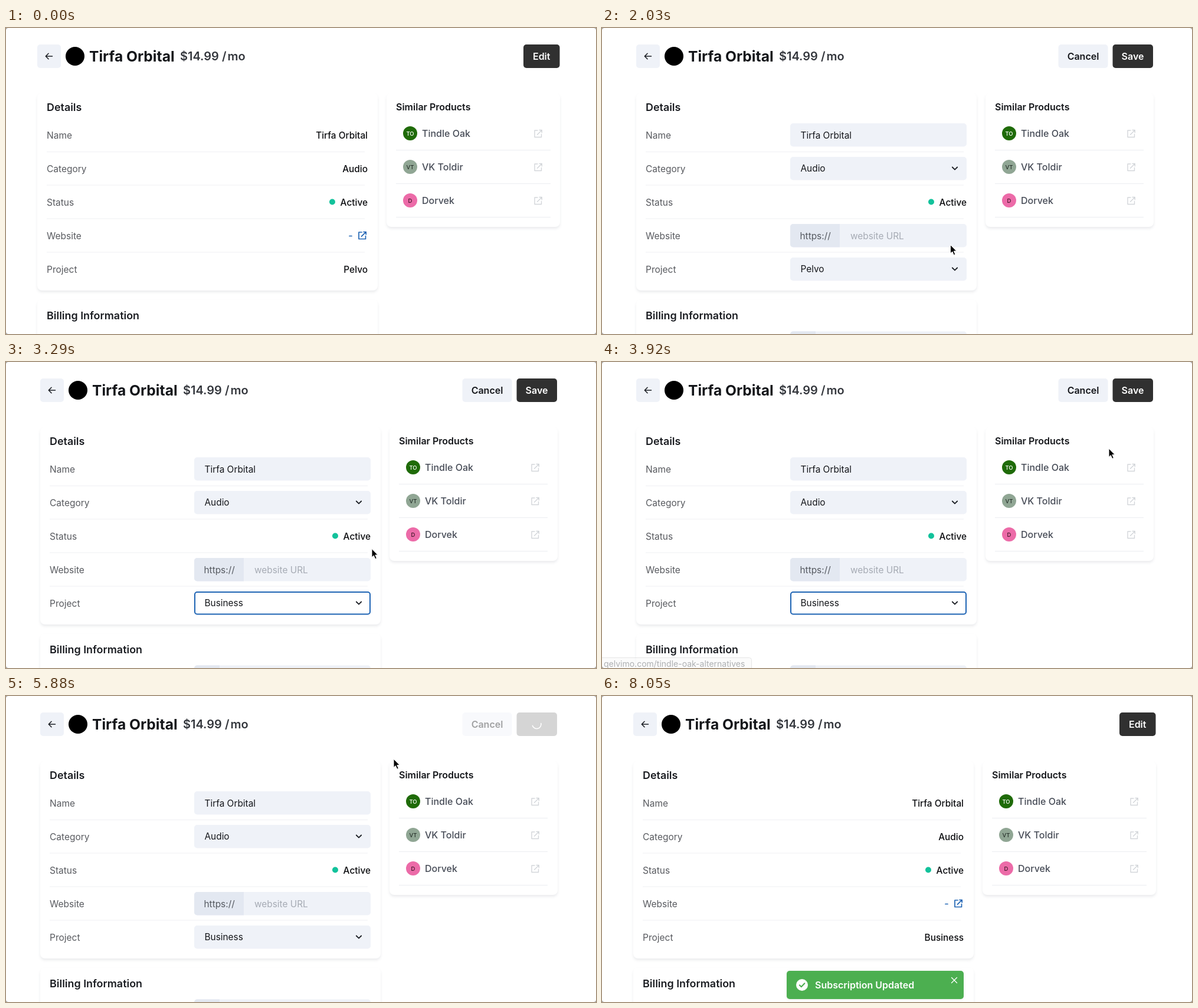
Write an HTML page that moves like this. It is 1000 by 520 pixels and loops after 8190 ms.

```html
<!DOCTYPE html>
<html lang="en">
<head>
<meta charset="utf-8">
<title>Edit subscription</title>
<style>
  html, body { margin: 0; width: 100%; height: 100%; overflow: hidden; background: #fff; }
  svg { display: block; width: 100%; height: 100%; }
  text { font-family: Inter, "Liberation Sans", sans-serif; font-size: 15.5px; fill: #14161a; white-space: pre; }
  .label { fill: #585a5f; }
  .value { font-size: 15.4px; font-weight: 450; fill: #0c0d10; text-anchor: end; }
  .field { font-size: 15.4px; }
  .head { font-size: 17.9px; font-weight: 600; fill: #1b1d22; }
  .button { font-size: 16px; font-weight: 600; text-anchor: middle; }
  .product { font-size: 16px; font-weight: 500; fill: #474c57; }
  .initials { font-size: 9.5px; font-weight: 500; text-anchor: middle; }
  .card { fill: #fff; filter: drop-shadow(0 3px 2px rgba(30, 40, 70, .09)); }
  .line { stroke: #eff0f3; }
  .stroke { fill: none; stroke-linecap: round; stroke-linejoin: round; }
</style>
</head>
<body>
<svg id="stage" viewBox="0 0 1000 520" xmlns="http://www.w3.org/2000/svg"></svg>
<script>
const LOOP = 8190, STEP = 70;
const SOFT = '#eff2f8', DARK = '#303030', BLUE = '#1e64b4';
const APP = 'Tirfa Orbital', OLD_PROJECT = 'Pelvo', NEW_PROJECT = 'Business';

const text = (x, y, str, cls = '', extra = '') =>
  `<text x="${x}" y="${y}" class="${cls}" ${extra}>${str}</text>`;
const box = (x, y, w, h, fill, r = 5, extra = '') =>
  `<rect x="${x}" y="${y}" width="${w}" height="${h}" rx="${r}" fill="${fill}" ${extra}/>`;
const path = (d, color, width, extra = '') =>
  `<path class="stroke" d="${d}" stroke="${color}" stroke-width="${width}" ${extra}/>`;
const rule = (x1, x2, y) => `<path class="line" d="M${x1} ${y}H${x2}"/>`;
const group = (id, body) => `<g id="${id}">${body}</g>`;
const linkIcon = (x, y, color, width) => path(
  `M${x - 1} ${y - 5.5}H${x - 6}V${y + 6}H${x + 5.5}V${y + 1}` +
  `M${x + 2} ${y - 6}H${x + 6.2}V${y - 1.8}M${x + 6} ${y - 5.8}L${x - 1.5} ${y + 1.7}`, color, width);
const chevron = y => path(`M593.8 ${y - 2}l4.2 4.2 4.2 -4.2`, '#1d2026', 1.8);

const rows = ['Name', 'Category', 'Status', 'Website', 'Project'];
const rowY = i => 187.5 + 57 * i;
const products = [
  ['Tindle Oak', 'TO', '#1f6b08', '#fff'],
  ['VK Toldir', 'VT', '#90a694', '#26302a'],
  ['Dorvek', 'D', '#ec6ba8', '#3a1526']
];

const main =
  box(53, 28, 40, 40, SOFT) +
  path('M78.5 48H67.5M72 43.3L67.3 48L72 52.7', '#1d2026', 1.6) +
  '<circle cx="117" cy="48" r="16" fill="#000"/>' +
  text(141, 57, APP, '', 'style="font-size:24.6px;font-weight:700"') +
  [[295, '$14.99'], [366, '/'], [375.5, 'mo']].map(([x, s]) =>
    text(x, 55, s, '', 'style="font-size:20px;font-weight:600;fill:#34373d"')).join('') +
  '<rect class="card" x="53" y="111" width="577" height="335" rx="8"/>' +
  '<rect class="card" x="53" y="462" width="577" height="120" rx="8"/>' +
  text(69, 141.3, 'Details', 'head') +
  text(69, 495, 'Billing Information', 'head') +
  rows.map((name, i) => text(69, rowY(i), name, 'label') +
    (i < 4 ? rule(69, 608, 210.5 + 57 * i - (i > 0 ? .5 : 0)) : '')).join('') +
  '<circle cx="553" cy="295.5" r="5" fill="#12c29b"/>' +
  text(613, 301.5, 'Active', 'value');

const view =
  text(613, 187.5, APP, 'value') +
  text(613, 244.5, 'Audio', 'value') +
  path('M582 353.5H586', BLUE, 1.7) + linkIcon(604, 352.5, BLUE, 1.7) +
  text(613, 415.5, '', 'value', 'id="viewProject"') +
  box(877, 28, 61.5, 40, DARK) +
  text(907.7, 53.7, 'Edit', 'button', 'style="fill:#fff"');

const edit =
  [162, 219, 333].map(y => box(319, y, 299, 39.5, SOFT)).join('') +
  box(319, 390, 299, 39.5, SOFT) +
  box(320, 391, 297, 37.5, '#fff', 4, `id="ring" stroke="${BLUE}" stroke-width="2"`) +
  text(336.5, 187.5, APP, 'field') +
  text(336.5, 244, 'Audio', 'field') + chevron(238.5) +
  '<path d="M403 333H324a5 5 0 0 0 -5 5v29.5a5 5 0 0 0 5 5H403z" fill="#e3e8f1"/>' +
  text(335.5, 358.5, 'https://', 'field', 'style="fill:#555960"') +
  text(421, 358.5, 'website URL', 'field', 'style="fill:#a6abb4"') +
  text(336.5, 415, '', 'field', 'id="editProject"') + chevron(409.5) +
  box(319, 515.5, 299, 39, SOFT) +
  '<path d="M362 515.5H324a5 5 0 0 0 -5 5V530H362z" fill="#e3e8f1"/>' +
  group('cancel', box(773.5, 28, 84, 40, SOFT) + text(815.5, 53.7, 'Cancel', 'button')) +
  box(865.5, 28, 68.5, 40, DARK, 5, 'id="saveBox"') +
  text(899.5, 53.7, 'Save', 'button', 'id="saveText" style="fill:#fff"') +
  '<circle id="spinner" class="stroke" cx="899.5" cy="48" r="7.5" stroke="#fff" stroke-width="1.6" stroke-dasharray="22.5 40"/>';

const side =
  '<rect id="sideCard" class="card" x="645" y="111" height="227" rx="8"/>' +
  text(661, 139.5, 'Similar Products', '', 'style="font-size:16px;font-weight:600"') +
  products.map(([name, initials, fill, ink], i) => {
    const y = 179 + 57 * i;
    return `<circle cx="685" cy="${y}" r="12" fill="${fill}"/>` +
      text(685, y + 3.5, initials, 'initials', `style="fill:${ink}"`) +
      text(705, y + 6, name, 'product') +
      `<path class="line sideRule" style="stroke:#ebedf1" d="M661 ${y + 28.5}H923"/>`;
  }).join('') +
  group('sideLinks', products.map((p, i) => linkIcon(902, 179.5 + 57 * i, '#d3d6da', 1.4)).join(''));

const popup =
  box(310.5, 342, 300, 88.5, '#5f6069', 6, 'stroke="#50515a" style="filter:drop-shadow(0 3px 4px rgba(0,0,0,.25))"') +
  box(316, 399, 289, 26.5, '#528bea', 4, 'id="choice"') +
  ['Select a project', NEW_PROJECT, OLD_PROJECT].map((s, i) =>
    text(335, 364.7 + 26 * i, s, '', 'style="font-size:15.4px;fill:#fff"')).join('') +
  path('M321 412.5l3 3.6 5 -8', '#fff', 1.7);

const toast =
  box(313, 467, 300, 48, '#4caf50', 5, 'style="filter:drop-shadow(0 1px 2px rgba(0,0,0,.08))"') +
  '<circle cx="339" cy="491" r="10" fill="#fff"/>' +
  path('M334.8 491.3l3 3 5.6 -6', '#4caf50', 2) +
  text(361, 497, 'Subscription Updated', '', 'style="font-size:16px;font-weight:600;fill:#fff"') +
  path('M592.5 478.5l9 9M601.5 478.5l-9 9', '#fff', 1.4);

const status =
  box(-5, 502.5, 258.5, 30, '#f8f8f8', 4, 'stroke="#ccc"') +
  text(3, 518, 'qelvimo.com/tindle-oak-alternatives', '', 'style="font-size:14px;fill:#5f6368"');

const arrow = '<path d="M0 0V14.5L3.3 11.5L5.8 17.3L8.3 16.2L5.8 10.6H10.3Z" fill="#000" stroke="#fff" stroke-width="1" stroke-linejoin="round"/>';
const hand = '<path d="M-1.6 10V1.3a1.5 1.5 0 0 1 3 0V6.5q1.5 -1.3 2.7 .3q1.5 -.9 2.4 .7q1.7 -.4 1.7 1.5V12q0 2 -1.5 3.5V17.5H-1.6V16L-5.3 11.2q-1.2 -2 .3 -2.4q1.5 -.3 3.4 2z" fill="#fff" stroke="#111" stroke-width="1.1" stroke-linejoin="round"/>' +
  path('M1.6 11.5v3.5M3.9 11.5v3.5M-.6 11.5v3.5', '#111', .8);

const corners = path('M0 2Q0 0 2 0M998 0Q1000 0 1000 2M0 518Q0 520 2 520M998 520Q1000 520 1000 518', '#8a8a8a', 1);

document.getElementById('stage').innerHTML =
  group('main', main) + group('view', view) + group('edit', edit) + group('side', side) +
  group('popup', popup) + group('toast', toast) + group('status', status) + corners +
  group('cursor', group('arrow', arrow) + group('hand', hand));

const el = id => document.getElementById(id);
const set = (id, name, value) => el(id).setAttribute(name, value);
const show = (id, on) => set(id, 'visibility', on ? 'visible' : 'hidden');
const clamp = v => Math.max(0, Math.min(1, v));
const ramp = (t, from, to) => clamp((t - from) / (to - from));
const pulse = (t, a, b, c, d) => ramp(t, a, b) - ramp(t, c, d);

// Pointer path: time, x, y, and 1 where the move to this point is eased
const track = [
  [70, 368, 457], [560, 842, 38, 1], [630, 842, 38], [840, 903, 50], [980, 902, 54],
  [1120, 897, 62], [1260, 896, 63], [1470, 896, 63], [2170, 555, 404, 1], [2310, 549, 400],
  [2660, 549, 400], [2870, 545, 386], [2940, 545, 386], [3430, 650, 290], [3780, 797, 178],
  [3920, 859, 147], [4200, 897, 60], [4340, 904, 28], [4620, 898, 42], [5040, 896, 46],
  [5460, 662, 112, 1], [5880, 657, 107], [6720, 657, 107], [6790, 660, 145], [6930, 690, 178],
  [7140, 750, 180], [7210, 750, 180], [7350, 710, 135], [7630, 672, 177], [7700, 672, 177],
  [7770, 540, 320], [7840, 394, 472], [7980, 394, 472]
];

function pointer(t) {
  const i = track.findIndex(k => k[0] > t);
  if (i < 1) return null;
  const [t0, x0, y0] = track[i - 1], [t1, x1, y1, eased] = track[i];
  let p = (t - t0) / (t1 - t0);
  if (eased) p = p * p * (3 - 2 * p);
  return [x0 + (x1 - x0) * p, y0 + (y1 - y0) * p];
}

function overLink(x, y, editing) {
  const onButton = y >= 28 && y <= 68 && x >= (editing ? 865 : 877) && x <= (editing ? 934 : 939);
  const onProduct = x > 672 && x < 923 && y > 165 && y < 195;
  return onButton || onProduct;
}

function draw(t) {
  const editing = t >= 910 && t < 5950;
  const shift = editing ? 5 : 0;
  set('main', 'transform', `translate(${shift})`);
  set('side', 'transform', `translate(${shift})`);
  set('sideLinks', 'transform', `translate(${-2 * shift})`);
  set('sideCard', 'width', editing ? 285 : 294);
  document.querySelectorAll('.sideRule').forEach((line, i) =>
    line.setAttribute('d', `M661 ${207.5 + 57 * i}H${923 - 2 * shift}`));
  el('view').style.display = editing ? 'none' : '';
  el('edit').style.display = editing ? '' : 'none';

  const project = t < 3010 ? OLD_PROJECT : NEW_PROJECT;
  el('viewProject').textContent = project;
  el('editProject').textContent = project;

  set('ring', 'opacity', pulse(t, 2240, 2520, 4690, 4830));
  const loading = ramp(t, 4760, 4970);
  set('cancel', 'opacity', 1 - .6 * loading);
  set('saveBox', 'opacity', 1 - .8 * loading);
  set('saveText', 'opacity', loading > 0 ? 0 : 1);
  set('spinner', 'opacity', loading > 0 ? 1 : 0);
  set('spinner', 'transform', `rotate(${(t - 5880) * .45 - 12} 899.5 48)`);

  set('popup', 'opacity', t < 2240 ? 0 : 1 - ramp(t, 3010, 3220));
  set('choice', 'y', t < 2730 ? 399 : 373);

  const rise = ramp(t, 5950, 6300);
  set('toast', 'transform', `translate(0 ${60 * (1 - rise) ** 3})`);
  show('toast', t >= 5950);
  set('status', 'opacity', .5 * pulse(t, 3780, 3920, 3990, 4200) + pulse(t, 6930, 7140, 7210, 7420));

  const at = pointer(t);
  el('cursor').style.display = at ? '' : 'none';
  if (at) {
    const over = overLink(at[0], at[1], editing);
    set('cursor', 'transform', `translate(${at[0].toFixed(1)} ${at[1].toFixed(1)})`);
    show('hand', over);
    show('arrow', !over);
  }
}

const start = performance.now();
function frame() {
  const t = (performance.now() - start) % LOOP;
  draw(Math.floor(t / STEP) * STEP);
  requestAnimationFrame(frame);
}
draw(0);
requestAnimationFrame(frame);
</script>
</body>
</html>
```
